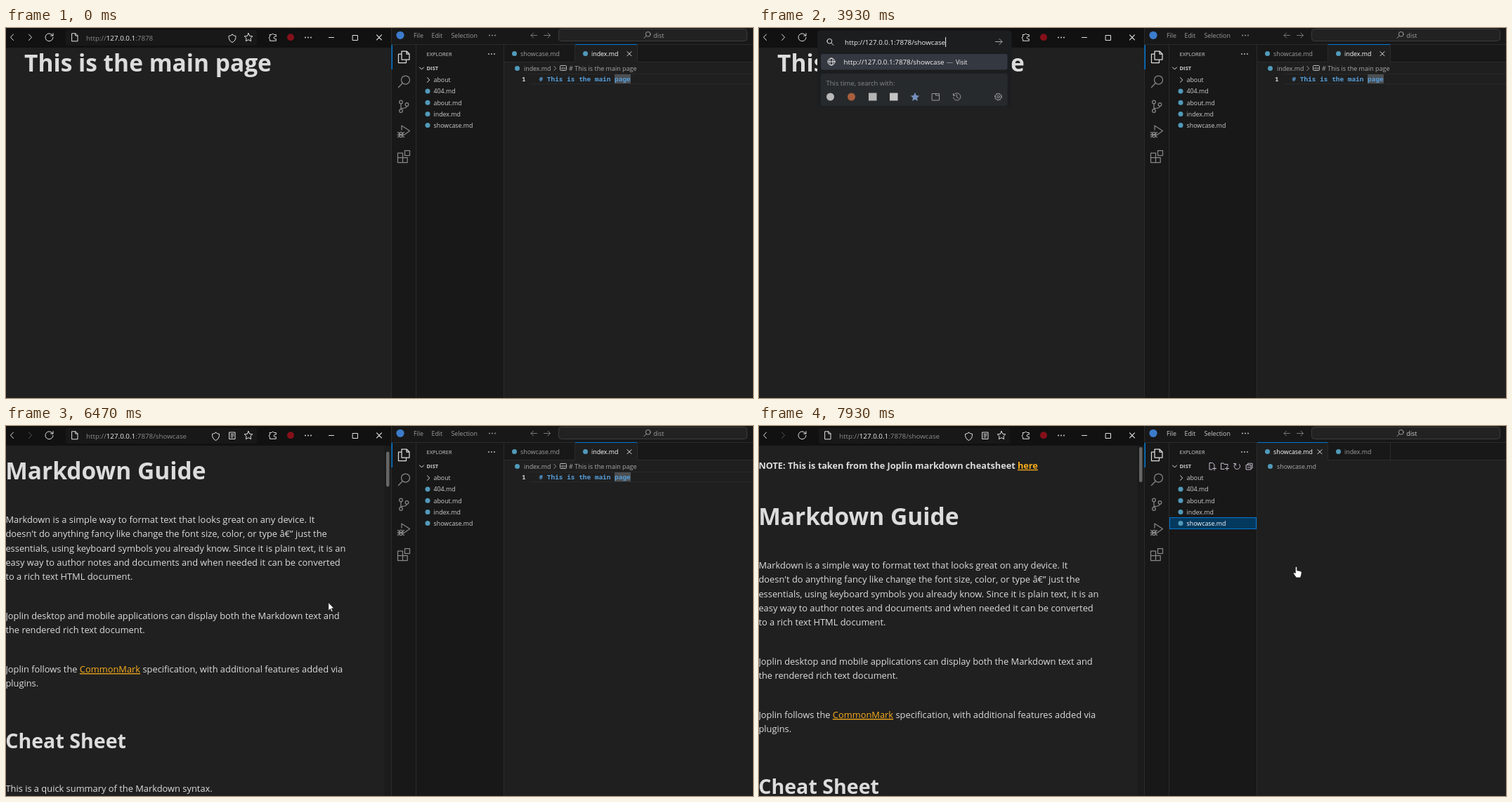
These frames come from a looping animation (1063x527 px, 8 s). An HTML page:

```html
<!DOCTYPE html>
<html lang="en">
<head>
<meta charset="utf-8">
<title>Markdown server preview</title>
<style>
  html, body { margin: 0; width: 100%; height: 100%; overflow: hidden; background: #181818; }
  #stage { display: block; width: 100vw; height: 100vh; }
  text { font-family: "Open Sans", "Noto Sans", sans-serif; white-space: pre; }
  .line { fill: none; stroke: #e2e2e2; stroke-width: 1; stroke-linecap: round; stroke-linejoin: round; }
  .grey { stroke: #868686; }
  .url { font-size: 9.8px; fill: #f2f2f2; }
  .ui { font-size: 8.85px; fill: #ccc; }
  .page { fill: #dcdcdc; font-size: 12.86px; }
  .page .h1 { font-size: 33.5px; font-weight: 700; }
  .page .h2 { font-size: 28.6px; font-weight: 700; }
  .page .note { font-size: 12.72px; font-weight: 700; }
  .link { fill: #f9ad1c; text-decoration: underline; }
  .code { font: 700 9.45px "Noto Sans Mono", "DejaVu Sans Mono", monospace; fill: #569cd6; }
  .cursor { fill: #fff; stroke: #111; stroke-width: .7; stroke-linejoin: round; }
</style>
</head>
<body>
<svg id="stage" viewBox="0 0 1063 527" preserveAspectRatio="none">
  <defs>
    <circle id="fileIcon" r="3.5" fill="#519aba"/>
    <g id="lens" class="line"><circle cx="1.2" cy="-1.2" r="3.4"/><path d="M-1.3 1.3-4.5 4.5"/></g>
    <g id="dots"><circle cx="-4" r=".9"/><circle r=".9"/><circle cx="4" r=".9"/></g>
    <path id="cross" d="M-3-3 3 3M3-3-3 3"/>
  </defs>

  <!-- Web page -->
  <rect width="548" height="527" fill="#202020"/>
  <svg y="28" width="548" height="499" viewBox="0 28 548 499" class="page">
    <text id="mainPage" class="h1" x="26" y="62">This is the main page</text>
    <g id="showcase">
      <text class="note" x="-.6" y="61">NOTE: This is taken from the Joplin markdown cheatsheet <tspan class="link">here</tspan></text>
      <text class="h1" x="-.8" y="141">Markdown Guide</text>
      <g id="body"></g>
      <text x="-.6" y="416">Joplin follows the <tspan class="link">CommonMark</tspan> specification, with additional features added via</text>
      <text class="h2" x="-.8" y="523.7">Cheat Sheet</text>
    </g>
    <g id="scrollbar">
      <rect x="538.5" y="28" width="9.5" height="499" fill="#1b1b1b"/>
      <rect id="thumb" x="541" width="4.5" rx="2.2" fill="#666"/>
    </g>
  </svg>

  <!-- Browser toolbar -->
  <rect width="548" height="28" fill="#111"/>
  <rect x="85" y="3" width="272" height="22" rx="3" fill="#181818"/>
  <g class="line">
    <path d="M10.5 9 6.5 13.2 10.5 17.5"/>
    <path id="forward" d="M32.5 9 36.5 13.2 32.5 17.5"/>
    <g id="reload"><path d="M66.5 11A5.5 5.5 0 1 0 67 13.5M67 7.7V11H63.6"/></g>
    <use id="stop" href="#cross" transform="translate(61.8 13.4) scale(1.25)"/>
    <path d="M94 7.8H99L102 10.8V18.8H94ZM98.7 8V11H102"/>
    <path id="shield" d="M0-5.6Q2.5-3.7 5-3.6Q5.4 3 0 5.6Q-5.4 3-5-3.6Q-2.5-3.7 0-5.6Z"/>
    <path id="reader" d="M318 9H326V18.5H318ZM320 11.5H324M320 13.7H324M320 15.9H323"/>
    <path d="M345 7.5 346.8 11.3 350.8 11.8 347.9 14.6 348.6 18.7 345 16.7 341.4 18.7 342.1 14.6 339.2 11.8 343.2 11.3Z"/>
    <path d="M375.5 9.5H378A1.8 1.8 0 0 1 381.4 9.5H384.3V12.2H382.8A1.6 1.6 0 0 0 382.8 15.5H384.3V18.3H375.5V15.7A1.8 1.8 0 0 1 375.5 12.3Z"/>
    <path d="M459.5 13.5H466.5M493.5 10.5H500.5V17.5H493.5Z"/>
    <use href="#cross" transform="translate(531 13.4) scale(1.15)"/>
  </g>
  <circle cx="405" cy="13.2" r="5" fill="#86101a"/>
  <use href="#dots" x="430" y="13.5" fill="#e2e2e2"/>
  <rect id="selection" x="113.5" y="7" width="97.5" height="13" fill="#27586a"/>
  <text id="address" class="url" x="114" y="17.5"><tspan class="dim">http://</tspan><tspan>127.0.0.1</tspan><tspan class="dim">:7878<tspan id="path">/showcase</tspan></tspan></text>

  <!-- Address suggestions -->
  <g id="dropdown">
    <rect id="panel" x="83" y="4" width="276.5" rx="4" fill="#1c1d1f"/>
    <use href="#lens" transform="translate(101.5 20) scale(-1 1)"/>
    <path class="line" style="stroke:#aaa" d="M336.5 19.5H346M342 15.5 346 19.5 342 23.5"/>
    <text id="typed" class="url" x="122" y="24"></text>
    <rect id="caret" y="13" width="1" height="14" fill="#eee"/>
    <g id="match">
      <rect x="88" y="37" width="265.5" height="22.5" rx="3" fill="#343840"/>
      <g class="line"><circle cx="103" cy="48" r="5"/><ellipse cx="103" cy="48" rx="2.2" ry="5"/><path d="M98 48H108"/></g>
      <text class="url" x="120.5" y="51.5"><tspan id="suggestion"></tspan><tspan fill="#aaa" dx="3">—</tspan><tspan dx="3.6" font-size="8.6">Visit</tspan></text>
    </g>
    <g id="engines">
      <rect x="88" y="65" width="265.5" height="46" rx="3" fill="#272a2d"/>
      <text x="95.5" y="81.5" font-size="9.45" fill="#85878a">This time, search with:</text>
      <circle cx="101.5" cy="98" r="5.5" fill="#b9b9b9"/>
      <circle cx="131.5" cy="98" r="5.5" fill="#a95f3d"/>
      <rect x="156" y="92.5" width="11.5" height="11" fill="#b5b5b5"/>
      <rect x="186" y="92.5" width="11.5" height="11" fill="#c4c4c4"/>
      <path fill="#758fbd" d="M222 91.8 223.9 96 228.2 96.5 225 99.5 225.8 104 222 101.8 218.2 104 219 99.5 215.8 96.5 220.1 96Z"/>
      <g class="line" style="stroke:#999">
        <path d="M246.5 93.5H256.5V103H246.5ZM251.5 93.5V96H256.5"/>
        <path d="M277 95.5A5.2 5.2 0 1 1 276.5 99M276.5 93.5V96.3H279.2M281.5 95V98.5L284 100"/>
        <circle cx="340.5" cy="98" r="4.2"/><circle cx="340.5" cy="98" r="1.7"/>
        <circle cx="340.5" cy="98" r="5" stroke-dasharray="1.4 2.5"/>
      </g>
    </g>
  </g>

  <!-- Editor window -->
  <rect x="548" width="515" height="527" fill="#181818"/>
  <rect x="709" y="48" width="354" height="479" fill="#1f1f1f"/>
  <path stroke="#2b2b2b" d="M548.5 0V527M548 23.5H1063M583.5 24V527M708.5 24V527M709 48.5H1063"/>
  <rect x="548.5" y="24" width="1.5" height="35" fill="#0078d4"/>
  <circle cx="561" cy="10.3" r="5.6" fill="#3c7ccc"/>
  <g id="menu">
    <text class="ui" style="fill:inherit" x="580" y="14">File</text>
    <text class="ui" style="fill:inherit" x="605.5" y="14">Edit</text>
    <text class="ui" style="fill:inherit" x="633.5" y="14">Selection</text>
    <use href="#dots" x="692" y="10.5"/>
  </g>
  <path class="line grey" style="stroke:#777" d="M755.5 10.5H747M750.5 7 747 10.5 750.5 14M765.5 10.5H774.5M771 7 774.5 10.5 771 14"/>
  <rect x="786.5" y="1.5" width="268" height="17" rx="4" fill="#222" stroke="#3b3b3b"/>
  <use href="#lens" x="912.5" y="10" opacity=".65"/>
  <text id="title" class="ui" x="921.3" y="13.7">dist</text>

  <g class="line grey" style="stroke-width:1.25">
    <path style="stroke:#ddd" d="M563 33H570L574 37V45H563ZM570 33V37H574M563 37H558.5V49.5H569.5V45"/>
    <circle cx="568.5" cy="74" r="6"/><path d="M564.3 78.5 558.5 84.5"/>
    <circle cx="562" cy="105.5" r="2.3"/><circle cx="562" cy="118" r="2.3"/><circle cx="570.5" cy="109" r="2.3"/>
    <path d="M562 108V115.5M570.5 111.5Q570 114.5 562.5 114.5"/>
    <path d="M563 145V139L574.5 146.5 567.5 151.5"/>
    <ellipse cx="562" cy="152" rx="2.7" ry="3.6"/><path d="M557.5 148.5 566.5 155.5M566.5 148.5 557.5 155.5M557 152H567"/>
    <path d="M557.5 178H564.5V191.5H557.5ZM557.5 184.7H571.2V191.5H564.5M567.5 174.5H574.5V181.5H567.5Z"/>
  </g>

  <text x="598.5" y="39.7" font-size="7.5" fill="#ccc">EXPLORER</text>
  <use href="#dots" x="691" y="37" fill="#ccc"/>
  <path class="line" d="M588.5 56 591.5 59 594.5 56M599.5 70.8 602.8 74 599.5 77.2"/>
  <text x="598.5" y="60.3" font-size="7.6" font-weight="700" fill="#ccc">DIST</text>
  <text class="ui" x="608.5" y="77">about</text>
  <rect id="row" x="584.5" y="130.5" width="123" height="16" fill="#04395e" stroke="#0078d4"/>
  <g id="files"></g>
  <g id="actions" class="line" style="stroke:#c9bfd2">
    <path d="M645 62H641V52.5H645.5L648 55V57M645.5 60.5H650.5M648 58V63"/>
    <path d="M662 61.5H657.5V53H661L662 54.5H667V57M663.5 60.5H668.5M666 58V63"/>
    <path d="M683.5 54.5A4.2 4.2 0 1 1 678 53.8M675.5 53.5H678.3V56.3"/>
    <path d="M693.5 55.5H700V62H693.5ZM695.5 55V53.3H702V60H700.5M695.2 58.8H698.4"/>
  </g>

  <!-- Tabs and editor -->
  <rect id="activeTab" y="24" height="25" fill="#1f1f1f"/>
  <rect id="tabAccent" y="23" height="1" fill="#0078d4"/>
  <path stroke="#2b2b2b" d="M809.5 24V48M898.5 24V48"/>
  <use href="#fileIcon" x="723.5" y="36.5"/><text id="showTab" class="ui" x="732" y="40">showcase.md</text>
  <use href="#fileIcon" x="824.5" y="36.5"/><text id="indexTab" class="ui" x="833" y="40">index.md</text>
  <use id="tabClose" href="#cross" class="line" y="36.7"/>
  <use href="#fileIcon" x="727.5" y="57.5"/>
  <g id="indexEditor">
    <text class="ui" x="737" y="61" fill-opacity=".8">index.md</text>
    <path class="line" style="stroke:#999" d="M779.8 54.5 782.8 57.5 779.8 60.5"/>
    <rect class="line" style="stroke:#bbb" x="788.5" y="53.5" width="9" height="7" rx="1"/>
    <text x="789.6" y="59" font-size="4.6" fill="#ccc">abc</text>
    <text class="ui" x="801" y="61" style="font-size:9px" fill-opacity=".8"># This is the main page</text>
    <path stroke="#292929" d="M745 65.5H1063M745 79.5H1063"/>
    <rect x="866" y="66" width="23" height="13" fill="#4c4f52"/>
    <text class="code" x="734" y="76" style="fill:#ccc">1</text>
    <text class="code" x="758.5" y="76"># This is the main page</text>
  </g>
  <text id="showCrumb" class="ui" x="737" y="61" fill-opacity=".8">showcase.md</text>

  <!-- Pointers -->
  <path id="arrow" class="cursor" d="M0 0V11.5L2.6 9.1 4.4 13.2 6.2 12.4 4.5 8.4H8Z"/>
  <path id="beam" fill="none" stroke="#e8e8e8" d="M-2.5-5.5H-.8L0-5 .8-5.5H2.5M0-5V5M-2.5 5.5H-.8L0 5 .8 5.5H2.5"/>
  <path id="hand" class="cursor" d="M-1.2 9V.9Q0-.9 1.2 .9V5.3L5.6 6.1Q7.8 6.6 7.7 8.7L7 12.2 6 15.5H0L-3.5 10.5Q-4.8 8.5-3 8.3Z"/>
</svg>

<script>
const $ = id => document.getElementById(id);
const show = (id, on) => $(id).style.display = on ? '' : 'none';
const set = (id, attrs) => { for (const k in attrs) $(id).setAttribute(k, attrs[k]); };
const place = (id, x, y) => set(id, { transform: `translate(${x} ${y})` });

// Linear interpolation through [time, value, ...] keys.
function track(keys, t) {
  const next = keys.findIndex(k => k[0] > t);
  if (next < 0) return keys[keys.length - 1].slice(1);
  if (next === 0) return keys[0].slice(1);
  const a = keys[next - 1], b = keys[next], p = (t - a[0]) / (b[0] - a[0]);
  return a.slice(1).map((v, i) => v + (b[i + 1] - v) * p);
}

const paragraphs = [
  [203, 'Markdown is a simple way to format text that looks great on any device. It',
    "doesn't do anything fancy like change the font size, color, or type â€” just the",
    'essentials, using keyboard symbols you already know. Since it is plain text, it is an',
    'easy way to author notes and documents and when needed it can be converted',
    'to a rich text HTML document.'],
  [340, 'Joplin desktop and mobile applications can display both the Markdown text and',
    'the rendered rich text document.'],
  [436.2, 'plugins.'],
  [585.5, 'This is a quick summary of the Markdown syntax.']
];
$('body').innerHTML = paragraphs.map(([y, ...lines]) =>
  lines.map((s, i) => `<text x="-.6" y="${y + i * 20.25}">${s}</text>`).join('')).join('');

$('files').innerHTML = ['404.md', 'about.md', 'index.md', 'showcase.md'].map((name, i) => {
  const y = 90 + i * 16.2;
  return `<use href="#fileIcon" x="600" y="${y}"/><text class="ui" x="608.5" y="${y + 3.3}">${name}</text>`;
}).join('');

const keystrokes = [2930, 3070, 3270, 3330, 3530, 3600, 3800, 3930];
const scrollX = [[4800, 28], [4930, 8], [5070, 0]];
const scrollY = [[5070, 0], [5130, -14], [5270, -14], [5470, -38], [5670, -51], [6070, -51], [6130, -53.5],
  [6330, -90], [6400, -90], [6600, -18], [6730, 4], [6800, 3.3], [6930, 1], [7000, 1], [7070, 0]];
const pointer = [[400, 1050, 508], [470, 760, 300], [530, 520, 150], [600, 338, 43], [4870, 468, 120], [5070, 442, 185],
  [5270, 440, 190], [5670, 420.5, 271], [6400, 420.5, 271], [6600, 530, 215], [6800, 660.5, 145.5],
  [7530, 660.5, 145.5], [7930, 764.5, 200.5]];
const beamPath = [[1000, 206, 20], [1200, 228, 13], [1470, 245, 9]];

function browser(t) {
  const loaded = t >= 4470, entered = t >= 4330;
  const open = t >= 2400 && t < 4270;
  show('mainPage', !loaded);
  show('showcase', loaded);
  show('scrollbar', t >= 4600);
  const [x] = track(scrollX, t), [y] = track(scrollY, t);
  place('showcase', x, y);
  set('thumb', { y: 30 - Math.min(0, y) * .1, height: t < 5330 ? 54 : 50 });

  const loading = entered && t < 5330;
  show('reload', !loading);
  show('stop', loading);
  $('forward').style.stroke = loaded ? '#555' : '';
  place('shield', t < 4530 ? 322 : 298.5, 15);
  show('shield', !open);
  show('reader', t >= 4530);

  const focused = t >= 1730 && !entered;
  show('selection', t >= 1870 && t < 2130);
  show('address', !open);
  show('path', t >= 4270);
  document.querySelectorAll('.dim').forEach(e => e.style.fill = focused ? '' : '#8a8a8a');

  show('dropdown', open);
  show('match', t >= 2470);
  show('engines', t >= 2530);
  set('panel', { height: t < 2470 ? 28 : t < 2530 ? 60 : 108 });
  const count = keystrokes.filter(k => k <= t).length;
  const url = 'http://127.0.0.1:7878/' + 'showcase'.slice(0, count);
  $('typed').textContent = $('suggestion').textContent = url;
  if (open) set('caret', { x: 122 + $('typed').getComputedTextLength() });
  show('caret', t < 2670 || t >= 2930);
}

function editor(t) {
  const opened = t >= 7600;
  $('menu').style.fill = $('title').style.fill = t >= 7330 ? '#ccc' : '#9d9d9d';
  show('row', t >= 7270);
  $('files').lastChild.style.fill = t >= 7270 ? '#fff' : '';
  show('actions', t >= 6730);
  const tab = opened ? { x: 709, width: 100 } : { x: 810, width: 88 };
  set('activeTab', tab);
  set('tabAccent', tab);
  set('tabClose', { x: tab.x + tab.width - 11 });
  $('showTab').style.fill = opened ? '#fff' : '#9d9d9d';
  $('indexTab').style.fill = opened ? '#9d9d9d' : '#fff';
  show('indexEditor', !opened);
  show('showCrumb', opened);
}

function pointers(t) {
  const [x, y] = track(pointer, t);
  const onFiles = t >= 6670;
  show('arrow', (t >= 400 && t < 670) || (t >= 4870 && !onFiles));
  show('hand', onFiles);
  place('arrow', x, y);
  place('hand', x, y);
  show('beam', t >= 1000 && t < 2400);
  place('beam', ...track(beamPath, t));
}

function draw(now) {
  const step = Math.floor((now % 8000) * .015 + .1) % 120;
  const t = Math.round(step * 100 / 15) * 10;
  browser(t);
  editor(t);
  pointers(t);
  requestAnimationFrame(draw);
}
draw(performance.now());
</script>
</body>
</html>
```
